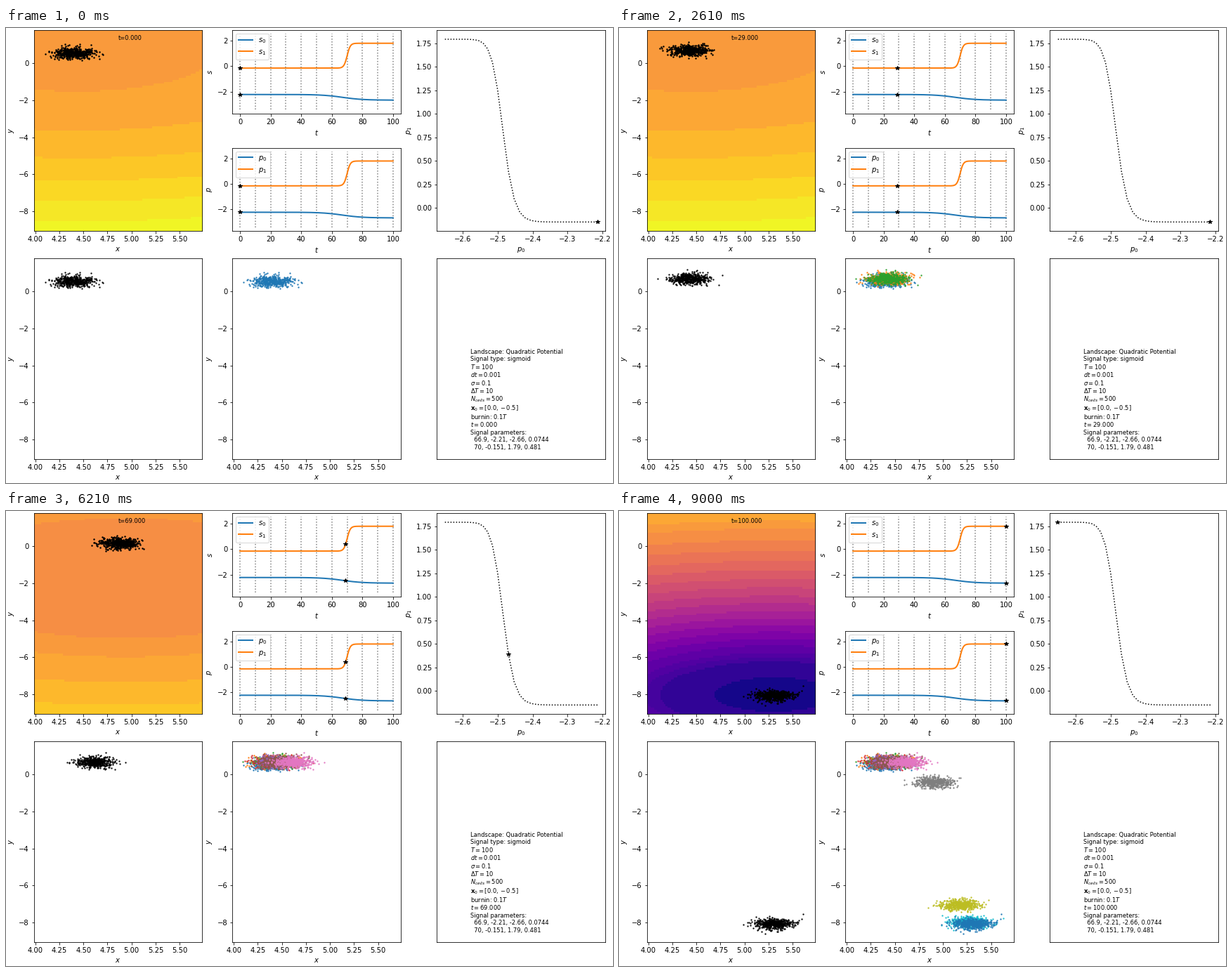
These frames come from a looping animation (864x648 px, 9090 ms). A matplotlib script:

```python
import numpy as np
import matplotlib.pyplot as plt
from matplotlib.animation import FuncAnimation
from matplotlib.colors import ListedColormap

W, H = 864, 648
T_END, DT_SNAP, N_CELLS, SIGMA, BURNIN = 100, 10, 500, 0.1, 10
XLIM, YLIM = (3.9855, 5.735), (-9.065, 1.78)
RATE = np.array([1 / 2, 2 / 9])  # stiffness of the quadratic well
START = np.array([0.0, -0.5])
SIGNALS = [(66.9, -2.2145, -2.656, 0.0744), (70, -0.151, 1.794, 0.481)]
SMALL = 8.33

# Panel geometry in pixels
COLS, ROWS = (39.7, 322.2, 613.2), (3, 328)
PANEL_W, PANEL_H, HALF_H = 239.6, 286.3, 118.6


def signal(t):
    """Both sigmoid signals at time t, stacked on the last axis."""
    t = np.asarray(t, float)
    return np.stack([a + (b - a) * (1 + np.tanh(r * (t - tc))) / 2
                     for tc, a, b, r in SIGNALS], axis=-1)


def simulate():
    """Cell positions at every integer time: drift of the mean plus noise."""
    rng = np.random.default_rng(2)
    sub = 100
    pos = START.copy()
    means = []
    for i in range(-BURNIN * sub, T_END * sub + 1):
        if i >= 0 and i % sub == 0:
            means.append(pos.copy())
        pos = pos - (RATE * pos + signal(max(i, 0) / sub)) / sub
    decay = np.exp(-RATE)
    spread = SIGMA / np.sqrt(2 * RATE)
    dev = spread * rng.standard_normal((N_CELLS, 2))
    cells = []
    for mean in means:
        cells.append(mean + dev)
        kick = rng.standard_normal((N_CELLS, 2))
        dev = decay * dev + spread * np.sqrt(1 - decay ** 2) * kick
    return cells


def potential(x, y, p):
    return x ** 2 / 4 + y ** 2 / 9 + p[0] * x + p[1] * y


times = np.arange(T_END + 1)
params = signal(times)
cells = simulate()

# Landscape grid and banded colours on a logarithmic scale
NGRID = 100
gx, gy = np.meshgrid(np.linspace(*XLIM, NGRID), np.linspace(*YLIM, NGRID))
low = potential(gx, gy, params[-1]).min()
top = np.log1p(potential(gx, gy, params[0]).max() - low)
edges = np.r_[0.03, 0.1, 0.125, np.arange(0.15, 0.72, 0.04),
              0.7535, 0.78, 0.823, 0.865, 0.904, 0.94, 0.977]
bounds = np.r_[0, edges, 1]
bands = ListedColormap(plt.get_cmap("plasma")((bounds[1:] + bounds[:-1]) / 2))


def landscape(t):
    level = np.log1p(np.maximum(potential(gx, gy, params[t]) - low, 0)) / top
    return np.digitize(level, edges)


fig = plt.figure(figsize=(W / 72, H / 72), dpi=72, facecolor="white")


def panel(left, upper, height=PANEL_H, xlabel="", ylabel=""):
    ax = fig.add_axes([left / W, 1 - (upper + height) / H,
                       PANEL_W / W, height / H])
    ax.set_xlabel(xlabel)
    ax.set_ylabel(ylabel)
    return ax


def state_panel(left, upper):
    ax = panel(left, upper, xlabel="$x$", ylabel="$y$")
    ax.set_xticks(np.arange(4, 5.6, 0.25))
    ax.set_yticks(range(-8, 1, 2))
    ax.set_xlim(XLIM)
    ax.set_ylim(YLIM)
    return ax


def cloud(ax, color, points, alpha=0.8):
    return ax.scatter(*points.T, s=2, color=color, alpha=alpha, zorder=2)


def star(ax):
    return ax.plot([], [], "k*", ms=6, zorder=4)[0]


def signal_panel(upper, name):
    ax = panel(COLS[1], upper, HALF_H, "$t$", f"${name}$")
    fine = np.linspace(0, T_END, 1001)
    for k in range(2):
        ax.plot(fine, signal(fine)[:, k], color=f"C{k}", lw=2,
                label=f"${name}_{k}$")
    ax.vlines(range(0, T_END + 1, DT_SNAP), -3.397, 2.527,
              color="gray", ls=":", lw=1.5, zorder=1)
    ax.set_xticks(range(0, 101, 20))
    ax.set_yticks([-2, 0, 2])
    ax.set_xlim(-5, 105)
    ax.set_ylim(-3.693, 2.823)
    ax.legend(loc="upper left")
    return [star(ax), star(ax)]


ax_land = state_panel(COLS[0], ROWS[0])
image = ax_land.imshow(landscape(0), origin="lower", extent=XLIM + YLIM,
                       aspect="auto", interpolation="nearest",
                       cmap=bands, vmin=-0.5, vmax=len(edges) + 0.5)
live = cloud(ax_land, "k", cells[0], alpha=1)
clock = ax_land.text(0.5, 0.95, "", fontsize=SMALL, transform=ax_land.transAxes)

trackers = (signal_panel(ROWS[0], "s")
            + signal_panel(ROWS[0] + PANEL_H - HALF_H, "p"))

ax_phase = panel(COLS[2], ROWS[0], xlabel="$p_0$", ylabel="$p_1$")
ax_phase.plot(params[:, 0], params[:, 1], "k:")
ax_phase.set_xticks([-2.6, -2.5, -2.4, -2.3, -2.2])
ax_phase.set_yticks(np.arange(0, 1.8, 0.25))
for k, set_lim in enumerate([ax_phase.set_xlim, ax_phase.set_ylim]):
    lo, hi = params[:, k].min(), params[:, k].max()
    set_lim(lo - 0.05 * (hi - lo), hi + 0.05 * (hi - lo))
phase_star = star(ax_phase)

latest = cloud(state_panel(COLS[0], ROWS[1]), "k", cells[0])

ax_hist = state_panel(COLS[1], ROWS[1])
history = [cloud(ax_hist, f"C{k % 10}", cells[k * DT_SNAP])
           for k in range(T_END // DT_SNAP + 1)]

ax_info = panel(COLS[2], ROWS[1])
ax_info.set_xticks([])
ax_info.set_yticks([])

# Each line with its distance in pixels from the line above
PLAIN, MATH, TALL = 10.6, 11.4, 12.7
INFO_LINES = [
    ("Landscape: Quadratic Potential", PLAIN),
    ("Signal type: sigmoid", PLAIN),
    ("$T=100$", MATH),
    ("$dt=0.001$", MATH),
    (r"$\sigma=0.1$", MATH),
    (r"$\Delta T=10$", MATH),
    ("$N_{cells}=500$", MATH),
    (r"$\mathbf{x}_0=[0.0, -0.5]$", TALL),
    ("burnin: $0.1T$", TALL),
    ("$t=%.3f$", MATH),
    ("Signal parameters:", PLAIN),
    ("  66.9, -2.21, -2.66, 0.0744", PLAIN),
    ("  70, -0.151, 1.79, 0.481", PLAIN),
]
baseline = 0.05
for line, gap in reversed(INFO_LINES):
    label = ax_info.text(0.2, baseline, line, fontsize=SMALL,
                         transform=ax_info.transAxes)
    baseline += gap / PANEL_H
    if "%" in line:
        info_time, time_format = label, line


def update(t):
    image.set_data(landscape(t))
    live.set_offsets(cells[t])
    clock.set_text(f"t={t:.3f}")
    for k, mark in enumerate(trackers):
        mark.set_data([t], [params[t, k % 2]])
    phase_star.set_data([params[t, 0]], [params[t, 1]])
    latest.set_offsets(cells[t - t % DT_SNAP])
    for k, dots in enumerate(history):
        dots.set_visible(k * DT_SNAP <= t)
    info_time.set_text(time_format % t)
    return []


anim = FuncAnimation(fig, update, frames=T_END + 1, interval=90,
                     repeat=True, repeat_delay=0, init_func=lambda: update(0))
plt.show()
```
